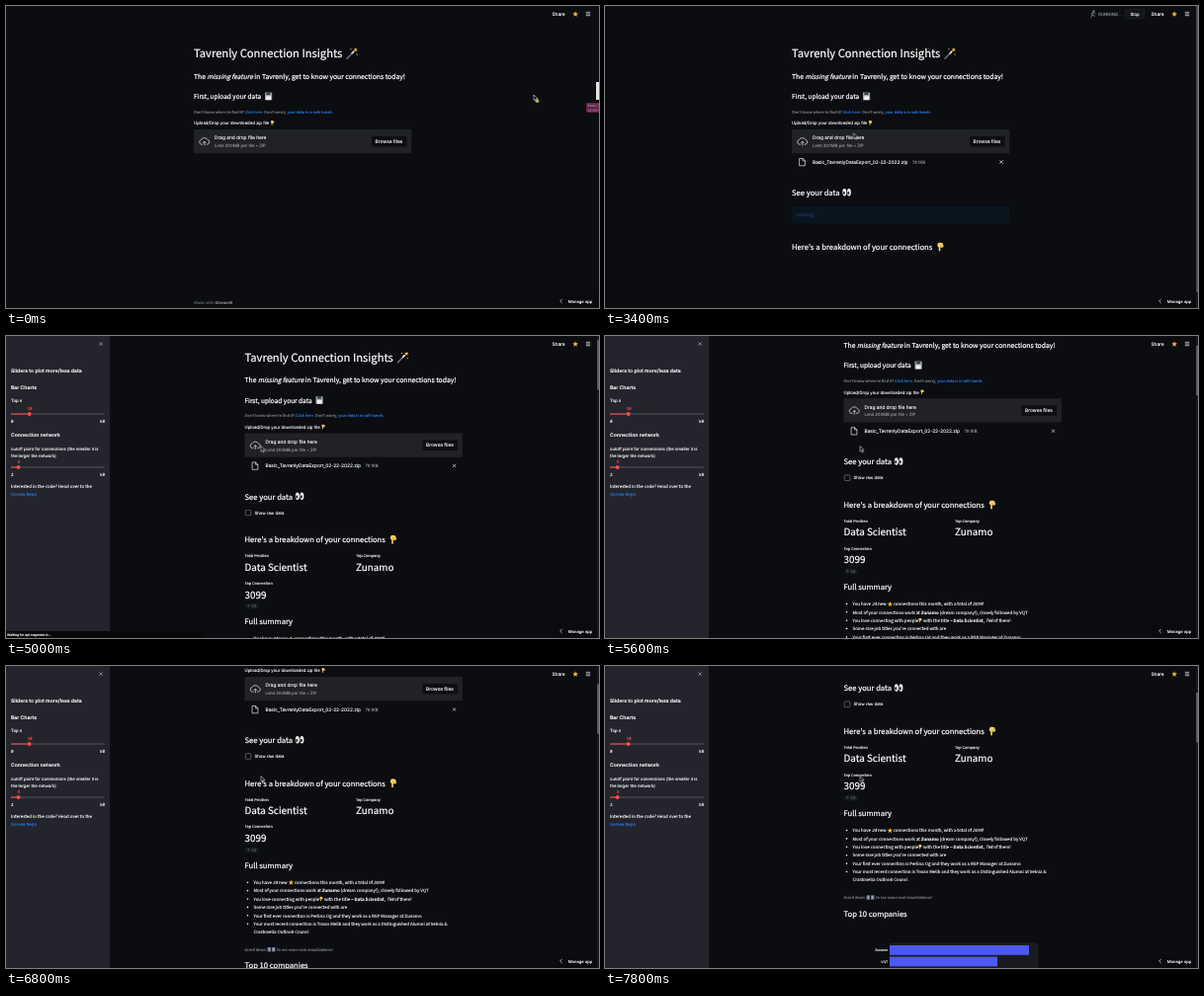
Animation, 600 px wide and 306 px high, one loop 8 s. Source, as an HTML page:

```html
<!DOCTYPE html>
<html lang="en">
<head>
<meta charset="utf-8">
<title>Connection Insights</title>
<style>
@property --scroll { syntax: '<number>'; inherits: true; initial-value: 0; }
html, body { margin: 0; width: 100%; height: 100%; overflow: hidden; background: #0b0d11; }
svg { display: block; width: 100%; height: 100%; --scroll: 0; animation: scroll 8s infinite; }
text {
  color: #fff; font: 4.25px Inter, sans-serif; stroke-width: .12;
  text-rendering: geometricPrecision; white-space: pre;
}
text, tspan { fill: currentColor; stroke: currentColor; }
.h1, .h2, .h3, .sub, .metric, .body, .note, .label {
  font-family: "Noto Sans CJK JP", "Noto Sans CJK SC", "Noto Sans", sans-serif;
}
.h1, .h2, .h3, .sub, .metric { stroke-width: .22; }
.h1 { font-size: 11.2px; }
.h2 { font-size: 7.65px; }
.h3 { font-size: 6.5px; }
.sub { font-size: 6.8px; }
.metric { font-size: 9.9px; }
.body { font-size: 4.45px; }
.note { font-size: 3.9px; color: #85868b; }
.label { font-size: 3.85px; }
.ui { font-size: 4.8px; }
.bold { font-size: 5.1px; font-weight: 600; }
.num { font: 4.3px "Noto Sans Mono", monospace; }
.tiny { font-size: 3.35px; }
.dim { color: #94959a; }
.faint { color: #66676d; }
.link { color: #2c7be5; }
.red { color: #ff4b4b; }
.mid { text-anchor: middle; }
.end { text-anchor: end; }
.it { font-style: italic; }
.b { font-weight: 700; }
.line { fill: none; stroke: #e8e8ea; stroke-width: .7; stroke-linecap: round; stroke-linejoin: round; }

.page { transform: translateY(calc(var(--scroll) * -1px)); }
.thumb { transform: translateY(calc(var(--scroll) * .164px - .6px)); }
.shift, .cursor, .drag, .row, .run, .footer, .data, .loading, .full, .side, .status, .tall, .breakdown, .pose-a, .pose-b {
  animation: 8s step-end infinite;
}
.shift { animation-name: shift; }
.cursor { animation-name: cursor; }
.breakdown { animation-name: breakdown; }
.drag { animation-name: drag; }
.row { animation-name: row; }
.run { animation-name: run; }
.footer { animation-name: footer; }
.data { animation-name: data; }
.loading { animation-name: loading; }
.full { animation-name: full; }
.side { animation-name: side; }
.status { animation-name: status; }
.tall { animation-name: tall; }
.pose-a { animation-name: pose-a; animation-duration: .4s; }
.pose-b { animation-name: pose-b; animation-duration: .4s; }

/* One step is 200 ms, or 2.5% of the loop. */
@keyframes scroll {
  0% { --scroll: 0; animation-timing-function: step-end; }
  57.5% { --scroll: 2.5; animation-timing-function: steps(2); }
  62.5% { --scroll: 26.5; animation-timing-function: steps(5); }
  75% { --scroll: 85.3; animation-timing-function: step-end; }
  77.5% { --scroll: 85.3; animation-timing-function: steps(3); }
  85% { --scroll: 114; animation-timing-function: steps(5); }
  97.5%, 100% { --scroll: 166.7; }
}
@keyframes shift {
  0% { transform: none; }
  32.5% { transform: translateX(-1px); }
  45%, 100% { transform: translateX(51.5px); }
}
@keyframes cursor {
  0% { transform: translate(534px, 90px); }
  2.5% { transform: translate(503px, 94px); }
  5% { transform: translate(434px, 103px); }
  7.5% { transform: translate(350px, 115px); }
  10% { transform: translate(281px, 125px); }
  12.5% { transform: translate(253px, 129px); }
  32.5% { transform: translate(251.5px, 128.8px); }
  47.5% { transform: translate(253px, 124px); }
  50% { transform: translate(256px, 117px); }
  52.5%, 100% { transform: translate(258px, 111.5px); }
}
@keyframes breakdown { 0% { transform: translateY(11.3px); } 47.5%, 100% { transform: none; } }
@keyframes drag { 0% { visibility: visible; } 12.5%, 100% { visibility: hidden; } }
@keyframes row { 0% { visibility: hidden; } 15%, 100% { visibility: visible; } }
@keyframes run { 0%, 55%, 100% { visibility: hidden; } 17.5% { visibility: visible; } }
@keyframes footer { 0% { visibility: visible; } 32.5%, 100% { visibility: hidden; } }
@keyframes data { 0% { visibility: hidden; } 32.5%, 100% { visibility: visible; } }
@keyframes loading { 0%, 47.5%, 100% { visibility: hidden; } 32.5% { visibility: visible; } }
@keyframes full { 0% { visibility: hidden; } 47.5%, 100% { visibility: visible; } }
@keyframes side { 0% { visibility: hidden; } 45%, 100% { visibility: visible; } }
@keyframes status { 0%, 65%, 100% { visibility: hidden; } 52.5% { visibility: visible; } }
@keyframes tall { 0%, 47.5%, 100% { visibility: hidden; } 32.5% { visibility: visible; } }
@keyframes pose-a { 0% { opacity: 1; } 50%, 100% { opacity: 0; } }
@keyframes pose-b { 0% { opacity: 0; } 50%, 100% { opacity: 1; } }
</style>
</head>
<body>
<svg viewBox="0 0 600 306">
  <defs>
    <symbol id="hand" viewBox="0 0 10 10">
      <path d="M2.6 .6Q5 -.4 7.4 1L8.6 4.2Q8.4 6.2 5 5.4V9.2Q4.2 10.4 3.3 9.2V5.6L1.6 3.6Z" fill="#fbd064"/>
      <path d="M5.2 3v2.2M6.8 3v2.4" stroke="#d79a2c" stroke-width=".6"/>
    </symbol>
    <symbol id="star" viewBox="0 0 10 10">
      <path d="M5 .3 6.4 3.6 9.9 3.9 7.2 6.2 8 9.7 5 7.8 2 9.7 2.8 6.2 .1 3.9 3.6 3.6Z" fill="#f9b43c"/>
    </symbol>
    <symbol id="close" viewBox="0 0 4 4"><path class="line" d="M.6 .6 3.4 3.4M3.4 .6 .6 3.4"/></symbol>
  </defs>

  <rect width="600" height="306" fill="#0b0d11"/>

  <g class="shift"><g class="page">
    <text class="h1" x="190" y="52">Tavrenly Connection Insights</text>
    <path d="M345 53.2 351.5 46.4" stroke="#77707c" stroke-width="1.5" stroke-linecap="round"/>
    <path d="M350.2 47.8 351.8 46.1" stroke="#e9e4e0" stroke-width="1.6" stroke-linecap="round"/>
    <use href="#star" x="351.5" y="42" width="4.4" height="4.4"/>
    <use href="#star" x="348" y="42.8" width="2" height="2"/>
    <use href="#star" x="354" y="48" width="2" height="2"/>

    <text class="sub" x="190" y="73.5">The <tspan class="it" style="font-size:6.5px">missing feature</tspan> in Tavrenly, get to know your connections today!</text>

    <text class="h3" x="190" y="94">First, upload your data</text>
    <path d="M262 87.4h6.3l.9.9v6.9H262Z" fill="#9da2ab"/>
    <rect x="263.4" y="87.4" width="4" height="2.6" fill="#3b3f48"/>
    <rect x="263.1" y="91.3" width="5" height="3.9" fill="#f0f0f0"/>

    <text class="note" x="190" y="108.5">Don't know where to find it? <tspan class="link">Click here</tspan>. Don't worry, <tspan class="link">your data is in safe hands</tspan></text>
    <text x="190" y="120.3">Upload/Drop your downloaded zip file</text>
    <use href="#hand" x="267" y="116" width="5" height="5"/>

    <rect x="190" y="125" width="220.3" height="24.2" rx="1" fill="#212228"/>
    <path class="line" d="M198.6 140.2H197.8a2.4 2.4 0 0 1-.3-4.7 3.5 3.2 0 0 1 6.4 0 2.4 2.4 0 0 1-.2 4.7H203M200.8 141V137.4M199.4 138.6 200.8 137.2 202.2 138.6"/>
    <text class="ui" x="211" y="135.4">Drag and drop file here</text>
    <text class="dim" x="211" y="143">Limit 200MB per file • ZIP</text>
    <rect x="370" y="132" width="35.6" height="10.5" rx="1.2" fill="#0c0e12"/>
    <text class="ui mid" x="387.4" y="138.6">Browse files</text>

    <g class="row">
      <path class="line" d="M198 154.5h3.2l2.2 2.2v5.1H198ZM201.1 154.6v2.2h2.2"/>
      <text class="ui" x="211" y="159.7">Basic_TavrenlyDataExport_02-22-2022.zip</text>
      <text class="dim" x="312" y="159.6">79.1KB</text>
      <use href="#close" x="400" y="156" width="4" height="4"/>
    </g>

    <g class="data">
      <text class="h2" x="190" y="192">See your data</text>
      <g fill="#f2f2f2"><ellipse cx="243.3" cy="188.8" rx="2" ry="3.8"/><ellipse cx="247.9" cy="188.8" rx="2" ry="3.8"/></g>
      <g fill="#2b2424"><ellipse cx="242.7" cy="189.4" rx="1" ry="1.7"/><ellipse cx="247.3" cy="189.4" rx="1" ry="1.7"/></g>
      <g class="breakdown">
        <text class="h2" x="190" y="235.9">Here's a breakdown of your connections</text>
        <use href="#hand" x="335.6" y="228.1" width="9.4" height="9.4"/>
      </g>
    </g>

    <g class="loading">
      <rect x="190" y="203" width="220" height="17.5" rx="1" fill="#0a1520"/>
      <text class="body" x="195" y="213.2" style="color:#17427a">Loading...</text>
    </g>

    <g class="full">
      <rect x="190.8" y="202.7" width="5.6" height="5.6" rx=".8" fill="none" stroke="#74757b" stroke-width=".7"/>
      <text x="200" y="207.2">Show raw data</text>

      <text class="label" x="190" y="250.7">Total Position</text>
      <text class="metric" x="190" y="264.2">Data Scientist</text>
      <text class="label" x="302.5" y="250.7">Top Company</text>
      <text class="metric" x="302.5" y="264.2">Zunamo</text>
      <text class="label" x="190" y="278.4">Top Connection</text>
      <text class="metric" x="190" y="292">3099</text>
      <rect x="190" y="297.4" width="14.5" height="6" rx="3" fill="#15181a"/>
      <text x="192" y="301.9" style="color:#5a5d52">↑ 24</text>

      <text class="h2" x="190" y="318.5">Full summary</text>
      <g fill="#fff">
        <circle cx="193" cy="333.2" r=".8"/><circle cx="193" cy="341.6" r=".8"/><circle cx="193" cy="350" r=".8"/>
        <circle cx="193" cy="358.4" r=".8"/><circle cx="193" cy="366.8" r=".8"/><circle cx="193" cy="375.2" r=".8"/>
      </g>
      <text class="body" x="199" y="334.9">You have <tspan class="it">24</tspan> new <tspan x="240.2">connections this month, with a total of </tspan><tspan class="it">3099</tspan>!</text>
      <use href="#star" x="234.2" y="330.5" width="5.4" height="5.4"/>
      <text class="body" x="199" y="343.3">Most of your connections work at <tspan class="b">Zunamo</tspan> (dream company!), closely followed by VQT</text>
      <text class="body" x="199" y="351.7">You love connecting with people <tspan x="270.4">with the title – </tspan><tspan class="b">Data Scientist</tspan>, <tspan class="it">764</tspan> of them!</text>
      <use href="#hand" x="265" y="347.5" width="4.8" height="4.8"/>
      <text class="body" x="199" y="360.1">Some rare job titles you're connected with are</text>
      <text class="body" x="199" y="368.5">Your first ever connection is Perlina Og and they work as a RSP Manager at Zunamo</text>
      <text class="body" x="199" y="376.9">Your most recent connection is Tovan Melik and they work as a Distinguished Alumni at Velnia &amp;</text>
      <text class="body" x="199" y="384.8">Crastovelia Outlook Counci</text>

      <text class="note" x="190" y="402.7">Scroll down <tspan x="222.5">to see some cool visualizations!</tspan></text>
      <g fill="#6d7689"><rect x="213" y="399" width="3.6" height="4.4" rx=".5"/><rect x="217.4" y="399" width="3.6" height="4.4" rx=".5"/></g>
      <path d="M214.8 400v2.2M219.2 400v2.2" stroke="#d5d9e2" stroke-width=".8"/>

      <text class="h2" x="190" y="420.4">Top 10 companies</text>
      <rect x="236.5" y="447" width="150" height="120" fill="#1a1b21"/>
      <g fill="#4d58f2"><rect x="236.5" y="449.7" width="141" height="9.8"/><rect x="236.5" y="461.3" width="109" height="9.8"/></g>
      <text class="tiny end" x="234.6" y="455.8">Zunamo</text>
      <text class="tiny end" x="234.6" y="467.4">VQT</text>
    </g>
  </g></g>

  <g class="footer">
    <text class="faint" x="190" y="301.6" style="font-size:4.15px">Made with <tspan class="dim" style="font-weight:500">Streamlit</tspan></text>
  </g>

  <g class="side">
    <rect width="105" height="306" fill="#24252c"/>
    <use href="#close" x="94" y="6" width="4" height="4" opacity=".65"/>
    <text class="bold" x="5" y="36.8">Sliders to plot more/less data</text>
    <text class="bold" x="5" y="53.8">Bar Charts</text>
    <text x="5" y="67.4">Top n</text>
    <text class="num red mid" x="24" y="75">10</text>
    <rect x="5" y="78.4" width="95" height="1.2" rx=".6" fill="#55565d"/>
    <rect x="5" y="78.4" width="19" height="1.2" rx=".6" fill="#ff4b4b"/>
    <circle cx="23.7" cy="79" r="1.9" fill="#ff4b4b"/>
    <text class="num" x="5" y="87.5">0</text><text class="num end" x="100" y="87.5">50</text>

    <text class="bold" x="5" y="101.8">Connection network</text>
    <text x="5" y="115.6">cutoff point for connections (the smaller it is</text>
    <text x="5" y="122.6">the larger the network)</text>
    <text class="num red mid" x="12.7" y="129.2">4</text>
    <rect x="5" y="132.4" width="95" height="1.2" rx=".6" fill="#55565d"/>
    <rect x="5" y="132.4" width="8" height="1.2" rx=".6" fill="#ff4b4b"/>
    <circle cx="12.6" cy="133" r="1.9" fill="#ff4b4b"/>
    <text class="num" x="5" y="141.5">2</text><text class="num end" x="100" y="141.5">50</text>

    <text class="body" x="5" y="153.8">Interested in the code? Head over to the</text>
    <text class="body link" x="5" y="161.6">Gorvex Repo</text>
  </g>

  <g class="status">
    <rect y="299" width="200" height="7" rx="1" fill="#08090b"/>
    <text class="tiny" x="1" y="303.9" style="font-weight:500">Waiting for api.segment.io...</text>
  </g>

  <g class="run">
    <g class="line" style="stroke:#94959a">
      <circle cx="494.4" cy="5.2" r=".7"/>
      <path class="pose-a" d="M493.7 6.6 492.6 9 494.6 10 494 12M492.6 9 490.6 11.4M493.7 6.6 491.4 7M493.7 6.6 495 8.2 496.4 7.8"/>
      <path class="pose-b" d="M493.7 6.6 493 9.2 495.6 10.2M493 9.2 491.8 11.8M493.7 6.6 492 8.2M493.7 6.6 496 7.4"/>
    </g>
    <text class="dim" x="499.2" y="10.1">RUNNING...</text>
    <rect x="526.3" y="3.2" width="19.4" height="9.6" rx="1.2" fill="#13151a" stroke="#2a2c33" stroke-width=".5"/>
    <text class="mid" x="536" y="9.6">Stop</text>
  </g>

  <text class="ui" x="552.5" y="9.7">Share</text>
  <use href="#star" x="573.2" y="5.1" width="5.8" height="5.8"/>
  <path d="M586.8 6.3h4.4M586.8 8h4.4M586.8 9.7h4.4" stroke="#d8d8da" stroke-width=".8"/>

  <path d="M553 306v-12q0-2 2-2h45v14Z" fill="#090b0f"/>
  <path class="line" d="M562.4 297.2 560.6 299 562.4 300.8"/>
  <text x="568.8" y="300.5" style="font-size:4.2px">Manage app</text>

  <g class="data"><rect x="598" width="2" height="306" fill="#17191d"/></g>
  <rect class="tall" x="598.3" width="1.6" height="290" rx=".8" fill="#5f6065"/>
  <g class="full"><rect class="thumb" x="598.3" width="1.6" height="51" rx=".8" fill="#6d6e73"/></g>

  <g class="cursor">
    <g class="drag">
      <rect x="63" y="-13" width="18" height="18" fill="#e4e4e6"/>
      <rect x="53" y="8" width="38" height="10" rx="1" fill="#6f2234"/>
      <text class="tiny" x="54.5" y="12.2" style="color:#7d86d8">Basic_Tavren</text>
      <text class="tiny" x="54.5" y="16.6" style="color:#7d86d8">02-22-2022.zip</text>
      <circle cx="3.4" cy="6.2" r="1.9" fill="#a9b04a"/>
    </g>
    <path d="M0 0v5.6l1.4-1.2 1 2.1.9-.4-1-2h1.9Z" fill="#050505" stroke="#f5f5f5" stroke-width=".55"/>
  </g>
</svg>
</body>
</html>
```
